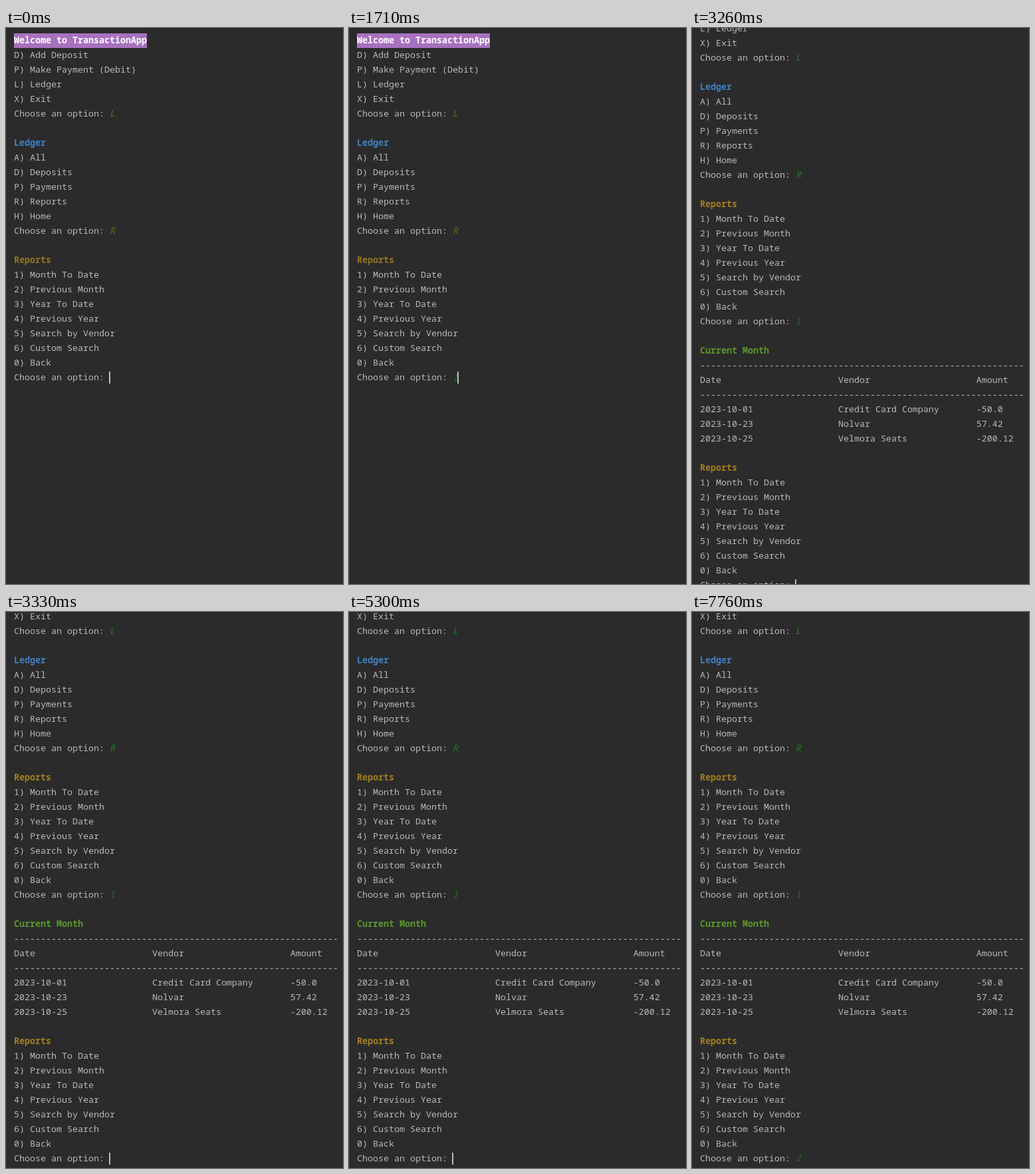
These frames come from a looping animation (507 px wide and 835 px high, 8 s). An HTML page:

```html
<!DOCTYPE html>
<html lang="en">
<head>
<meta charset="utf-8">
<title>Console ledger</title>
<style>
html, body { margin: 0; width: 100%; height: 100%; overflow: hidden; background: #2b2b2b; }
#stage {
  position: relative; width: 507px; height: 835px; overflow: hidden;
  box-sizing: border-box; box-shadow: inset 1px 0 #323334, inset -1px 0 #323334;
  --yellow: #92761f; --input: #5a6f14;
}
#stage.scrolled { --yellow: #a57f1e; --input: #1f7f1f; }
#page { position: absolute; left: 0; top: 0; }
pre {
  position: absolute; left: 12px; top: 7px; margin: 0; color: #bcb8b4;
  font: 13.333px/22px "Noto Sans Mono", "DejaVu Sans Mono", monospace;
}
b { font-weight: 700; }
.title {
  display: inline-block; position: relative; top: 1px; height: 22px; line-height: 20px;
  vertical-align: top; color: #fff; background: #a771bf;
}
.blue { color: #3f80c4; }
.yellow { color: var(--yellow); }
.green { color: #5c962c; }
i { color: var(--input); }
i.fresh { color: #1a761a; }
#cursor { position: absolute; width: 2px; height: 18px; background: #bbb; }
</style>
</head>
<body>
<div id="stage"><div id="page"><pre id="text"></pre><div id="cursor"></div></div></div>
<script>
const LOOP = 8000, ROW = 22, COL = 8;
const $ = id => document.getElementById(id);

const prompt = "Choose an option: ";
const row = (date, vendor, amount) => date.padEnd(26) + vendor.padEnd(26) + amount;
const rule = "-".repeat(61);

const reports = `<b class="yellow">Reports</b>
1) Month To Date
2) Previous Month
3) Year To Date
4) Previous Year
5) Search by Vendor
6) Custom Search
0) Back
${prompt}`;

const start = `<b class="title">Welcome to TransactionApp</b>
D) Add Deposit
P) Make Payment (Debit)
L) Ledger
X) Exit
${prompt}<i>L</i>

<b class="blue">Ledger</b>
A) All
D) Deposits
P) Payments
R) Reports
H) Home
${prompt}<i>R</i>

${reports}`;

const picked = start + '<i class="fresh">1</i>';

const month = [
  picked,
  "",
  '<b class="green">Current Month</b>',
  rule,
  row("Date", "Vendor", "Amount"),
  rule,
  row("2023-10-01", "Credit Card Company", "-50.0"),
  row("2023-10-23", "Nolvar", "57.42"),
  row("2023-10-25", "Velmora Seats", "-200.12"),
  "",
  reports
].join("\n");

// Each state: start time, text, scroll offset, cursor line and column
const states = [
  [0, start, 0, 23, 18],
  [1710, picked, 0, 23, 19],
  [3070, picked, 0, 24, 0],
  [3260, month, 84, 41, 18],
  [3330, month, 100, 41, 18],
  [7100, month + '<i class="fresh">2</i>', 100, 41, 19]
];

// Times at which the cursor toggles, beginning visible
const blinks = [320, 850, 1310, 1710, 2310, 2860, 3850, 4310,
  4840, 5300, 5830, 6290, 6770, 7100, 7760];

let shown;

function show(state) {
  const [, text, scroll, line, col] = state;
  $("text").innerHTML = text;
  $("stage").classList.toggle("scrolled", scroll > 0);
  $("page").style.top = -scroll + "px";
  $("cursor").style.left = Math.max(12, 11 + col * COL) + "px";
  $("cursor").style.top = 10 + line * ROW + "px";
  shown = state;
}

function draw() {
  const t = performance.now() % LOOP;
  const state = states.filter(s => s[0] <= t).pop();
  if (state !== shown) show(state);
  const toggles = blinks.filter(b => b <= t).length;
  $("cursor").style.visibility = toggles % 2 ? "hidden" : "visible";
  requestAnimationFrame(draw);
}
draw();
</script>
</body>
</html>
```
